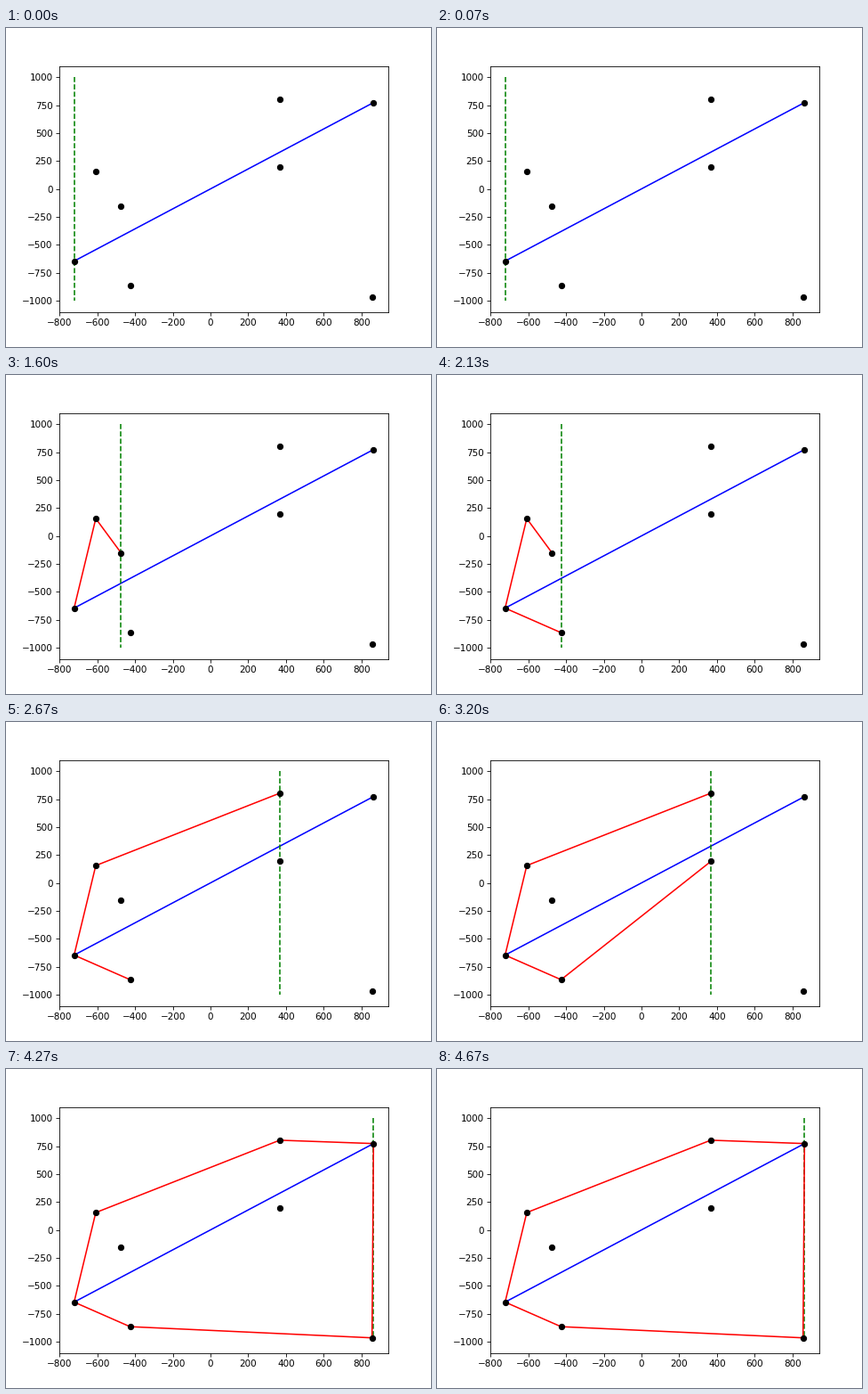
Recreate the animation shown at these times as a matplotlib script. Size 478 by 358 pixels, loop 5340 ms.

```python
import matplotlib.pyplot as plt
from matplotlib.animation import FuncAnimation

LOOP, INTERVAL = 5340, 20      # ms
STEP = 1600 / 3                # ms per sweep step

POINTS = [(-724, -645), (-609, 157), (-475, -150), (-427, -865),
          (367, 805), (370, 197), (857, -965), (865, 775)]
FIRST, LAST = POINTS[0], POINTS[-1]


def cross(o, a, b):
    return (a[0] - o[0]) * (b[1] - o[1]) - (a[1] - o[1]) * (b[0] - o[0])


def extend(chain, p, turn):
    """Append p, dropping earlier points that would make the chain concave."""
    chain = list(chain)
    while len(chain) > 1 and turn * cross(chain[-2], chain[-1], p) <= 0:
        chain.pop()
    return chain + [p]


def sweep():
    """Sweep position with upper and lower chain after each point."""
    upper, lower = [FIRST], [FIRST]
    states = [(FIRST[0], upper, lower)]
    for p in POINTS[1:]:
        side = cross(FIRST, LAST, p)
        if side >= 0:
            upper = extend(upper, p, -1)
        if side <= 0:
            lower = extend(lower, p, 1)
        states.append((p[0], upper, lower))
    return states


STATES = sweep()

fig, ax = plt.subplots(figsize=(6.4, 4.7934), dpi=74.6875)
ax.plot(*zip(*POINTS), "ko", zorder=5)
ax.plot(*zip(FIRST, LAST), "b-", zorder=2)
sweep_line, = ax.plot([FIRST[0]] * 2, [1000, -1000], "g--", zorder=3)
upper_line, = ax.plot([], [], "r-", zorder=4)
lower_line, = ax.plot([], [], "r-", zorder=4)
ax.set_xlim(-803.5, 944.5)
ax.set_ylim(-1100, 1100)


def update(i):
    step = int((i * INTERVAL + 14) / STEP)
    x, upper, lower = STATES[min(max(step - 1, 0), len(STATES) - 1)]
    sweep_line.set_xdata([x, x])
    upper_line.set_data(*zip(*upper))
    lower_line.set_data(*zip(*lower))
    return sweep_line, upper_line, lower_line


anim = FuncAnimation(fig, update, frames=LOOP // INTERVAL,
                     interval=INTERVAL, repeat=True, repeat_delay=0)
plt.show()
```
